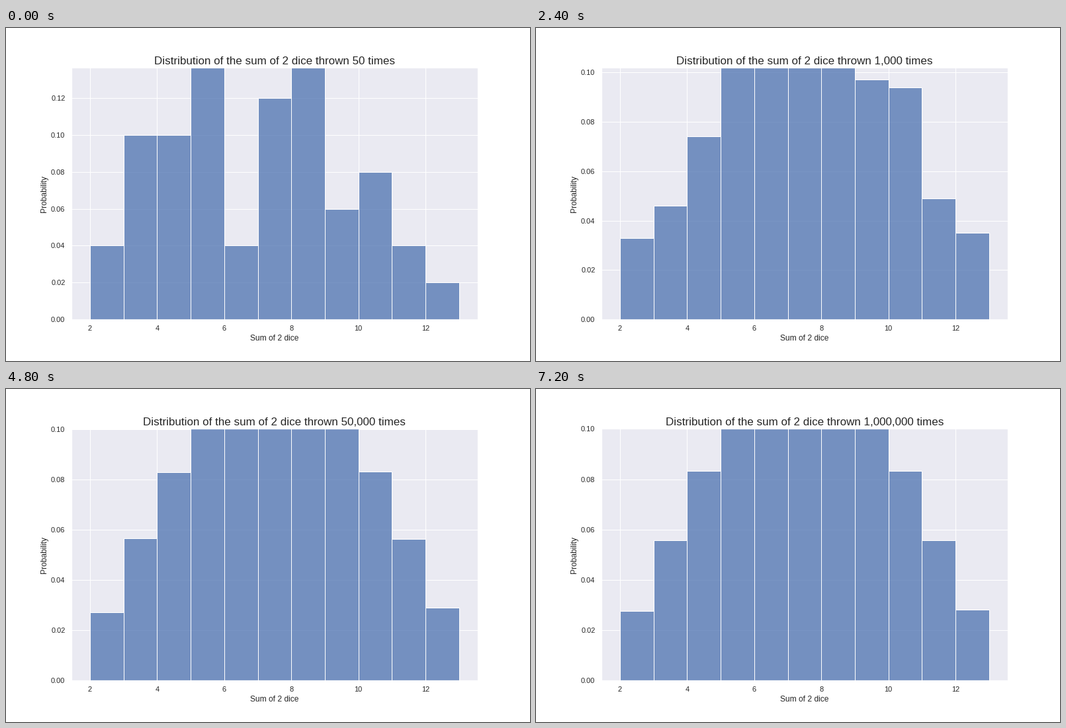
A matplotlib script that plays this animation: 792x504 px, repeating every 8000 ms.

```python
import numpy as np
import matplotlib.pyplot as plt
from matplotlib.animation import FuncAnimation

INK = "0.15"
plt.rcParams.update({
    "font.family": "Liberation Sans",
    "text.color": INK, "axes.labelcolor": INK,
    "xtick.color": INK, "ytick.color": INK,
    "axes.facecolor": "#EAEAF2", "axes.edgecolor": "white",
    "axes.linewidth": 1.25, "axes.axisbelow": True,
    "axes.grid": True, "grid.color": "white", "grid.linewidth": 1,
    "xtick.bottom": False, "ytick.left": False,
    "xtick.major.size": 6, "ytick.major.size": 6,
    "xtick.labelsize": 11, "ytick.labelsize": 11,
    "axes.labelsize": 12, "axes.titlesize": 17, "axes.titlepad": 5.5,
})

SUMS = np.arange(2, 13)
CHANCE = (6 - abs(SUMS - 7)) / 36
THROWS = [50, 100, 500, 1000] + [k * 10**e for e in (3, 4, 5) for k in (5, 10)]

# The short runs are too erratic for a rule, so they are kept as counts.
COUNTS = {
    50: [2, 5, 5, 10, 2, 6, 10, 3, 4, 2, 1],
    100: [2, 11, 13, 13, 8, 14, 14, 10, 11, 2, 2],
    500: [16, 24, 50, 60, 70, 80, 70, 55, 37, 23, 15],
    1000: [33, 46, 74, 120, 140, 167, 145, 97, 94, 49, 35],
}
# Deviation of the outer sums in long runs, fading with the root of n.
LUCK = np.array([-.13, .23, -.12, 0, 0, 0, 0, 0, -.07, .15, .27])


def shares(n):
    if n in COUNTS:
        return np.array(COUNTS[n]) / n
    return CHANCE + LUCK / np.sqrt(n)


fig = plt.figure(figsize=(11, 7), dpi=72, facecolor="white")
ax = fig.add_axes([0.125, 0.125, 0.775, 0.755])
bars = ax.bar(SUMS, 0 * SUMS, width=1, align="edge",
              facecolor=(76 / 255, 114 / 255, 176 / 255, 0.75),
              edgecolor="white", linewidth=1)
ax.set_xlim(1.45, 13.55)
ax.set_xticks(SUMS[::2])
ax.set_xlabel("Sum of 2 dice", labelpad=3.3)
ax.set_ylabel("Probability")
title = ax.set_title("")


def draw(i):
    n = THROWS[i]
    for bar, share in zip(bars, shares(n)):
        bar.set_height(share)
    top = 0.1 + 20 / (11 * n)
    ax.set_yticks(np.arange(0, top, 0.02))
    ax.set_ylim(0, top)
    ax.yaxis.set_major_formatter("{x:.2f}")
    title.set_text(f"Distribution of the sum of 2 dice thrown {n:,} times")
    return [*bars, title]


anim = FuncAnimation(fig, draw, frames=len(THROWS), init_func=lambda: draw(0),
                     interval=800, repeat=True, repeat_delay=0, blit=False)
plt.show()
```
